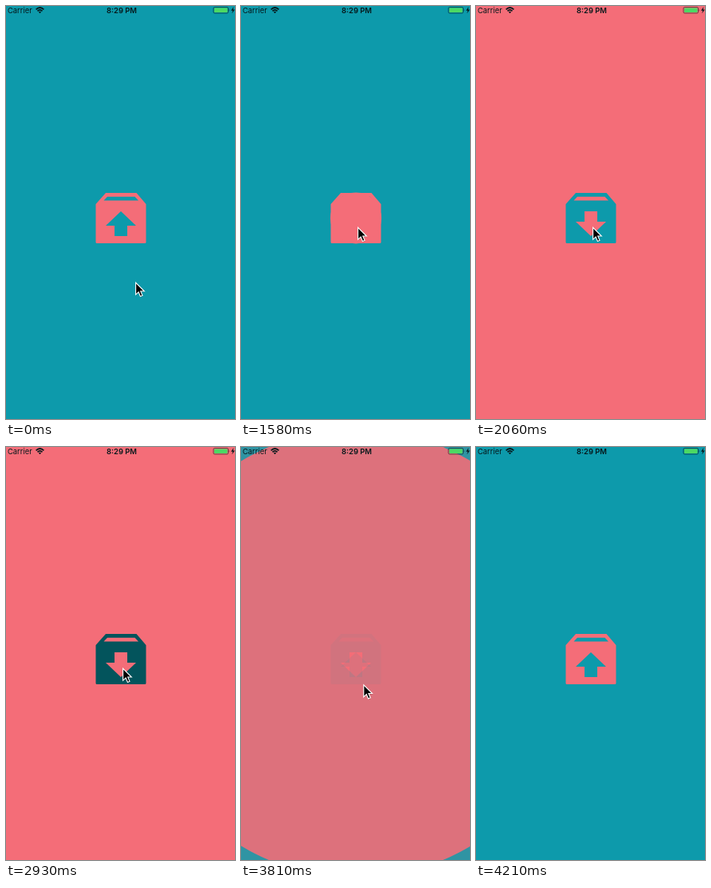
An HTML page for the animation above (5.17 s loop, 287x517 px).

```html
<!DOCTYPE html>
<html lang="en">
<head>
<meta charset="utf-8">
<title>Circle transition</title>
<style>
html, body { margin: 0; width: 100%; height: 100%; overflow: hidden; background: #0d9aab; }
svg { display: block; width: 100vw; height: 100vh; }
text { font: 9.4px Inter, "Liberation Sans", sans-serif; fill: #06181b; }
</style>
</head>
<body>
<svg viewBox="0 0 287 517">
  <defs>
    <path id="box" d="M125 234H163.500L175.500 248V295.500Q175.500 297 174 297H114Q112.500 297 112.500 295.500V248ZM127 238.700L122.500 243.500H166L161.500 238.700Z"/>
    <path id="arrow" d="M144 257L163 275H152V288H136V275H125Z"/>
    <mask id="up" maskUnits="userSpaceOnUse" x="0" y="0" width="287" height="517">
      <rect width="287" height="517" fill="#fff"/><use href="#arrow"/>
    </mask>
    <mask id="down" maskUnits="userSpaceOnUse" x="0" y="0" width="287" height="517">
      <rect width="287" height="517" fill="#fff"/><use href="#arrow" transform="matrix(1 0 0 -1 0 545)"/>
    </mask>
  </defs>
  <rect width="287" height="517" fill="#0d9aab"/>
  <use id="upIcon" href="#box" mask="url(#up)" fill-rule="evenodd"/>
  <rect id="wash" width="287" height="517" fill="#f46d78"/>
  <circle id="disc" cx="144" fill="#f46d78"/>
  <use id="downIcon" href="#box" mask="url(#down)" fill-rule="evenodd"/>

  <text x="2" y="8.600">Carrier</text>
  <text x="145" y="8.600" text-anchor="middle" style="font-weight:600">8:29 PM</text>
  <g fill="none" stroke="#06181b" stroke-width="1.700">
    <path d="M37.600 4.300Q42.500 -.3 47.400 4.300M39.500 6.300Q42.500 3.500 45.500 6.300"/>
    <path d="M42.500 9.200L40.900 7.500Q42.500 6.200 44.100 7.500Z" fill="#06181b" stroke="none"/>
    <rect x="260" y="1.500" width="18.500" height="7.500" rx="1.500" stroke-width="1" stroke-opacity=".55"/>
  </g>
  <rect x="261" y="2.500" width="16.500" height="5.500" rx=".7" fill="#4cd964"/>
  <path d="M279.500 3.800Q281 5.200 279.500 6.700Z" fill="#06181b" fill-opacity=".55"/>
  <path d="M285.300 1L282 5.700H284.100L283.300 9.300L286.700 4.500H284.600Z" fill="#06181b"/>

  <g id="cursor">
    <path d="M1 1.500V17L4.500 13.800L6.800 19.200L9.600 18L7.300 12.700H12Z" fill="#000" opacity=".2"/>
    <path d="M.6 .8V15.800L4.100 12.500L6.400 18L9 16.900L6.700 11.500H11.300Z" fill="#000" stroke="#fff" stroke-width="1.100"/>
  </g>
</svg>
<script>
const LOOP = 5170, TEAL = '#0d9aab', PINK = '#f46d78';
const PRESS = 1170, OPEN = 1580, PRESS_BACK = 2930, CLOSE = 3590;
const [upIcon, downIcon, wash, disc, cursor] =
  ['upIcon', 'downIcon', 'wash', 'disc', 'cursor'].map(id => document.getElementById(id));

const path = [[540, 162, 345.5], [1050, 146, 276.5], [3740, 146, 276.5], [3810, 153, 296.5],
  [3870, 163, 330.5], [4100, 201, 445], [4230, 236, 522]];

const mix = (a, b, p) => a + (b - a) * p;
const clamp = p => Math.min(1, Math.max(0, p));

// cubic-bezier(.42, 0, .58, 1), solved by bisection
function ease(x) {
  let lo = 0, hi = 1, s = .5;
  for (let i = 0; i < 24; i++) {
    s = (lo + hi) / 2;
    const u = 1 - s;
    if (1.26 * s * u * u + 1.74 * s * s * u + s ** 3 < x) lo = s; else hi = s;
  }
  return s * s * (3 - 2 * s);
}
const span = (t, start, length) => ease(clamp((t - start) / length));

function cursorAt(t) {
  const i = path.findIndex(k => k[0] > t);
  if (i === 0) return path[0].slice(1);
  if (i < 0) return path[path.length - 1].slice(1);
  const [t0, x0, y0] = path[i - 1], [t1, x1, y1] = path[i];
  let p = (t - t0) / (t1 - t0);
  if (i === 1) p = ease(p);
  return [mix(x0, x1, p), mix(y0, y1, p)];
}

function set(el, attrs) {
  for (const name in attrs) el.setAttribute(name, attrs[name]);
}

function draw(t) {
  const closing = t >= CLOSE;
  const fade = 1 - span(t, CLOSE, 300);
  const grow = span(t, 1585, 500) - span(t, 3513, 560);
  const r = mix(32, 591, Math.max(0, grow));

  set(upIcon, { fill: t >= PRESS && t < OPEN ? '#863c42' : PINK });
  set(wash, { opacity: closing ? fade : 0 });
  set(disc, { r, cy: 265.5 - .028 * (r - 32), opacity: t < OPEN ? 0 : 1 - span(t, 3745, 275) });
  set(downIcon, {
    fill: t >= PRESS_BACK && !closing ? '#03545c' : TEAL,
    opacity: closing ? fade : span(t, 1840, 220)
  });
  set(cursor, { transform: `translate(${cursorAt(t)})`, visibility: t < 4210 ? 'visible' : 'hidden' });
}

const begin = performance.now();
function tick() {
  draw((performance.now() - begin) % LOOP);
  requestAnimationFrame(tick);
}
tick();
</script>
</body>
</html>
```
